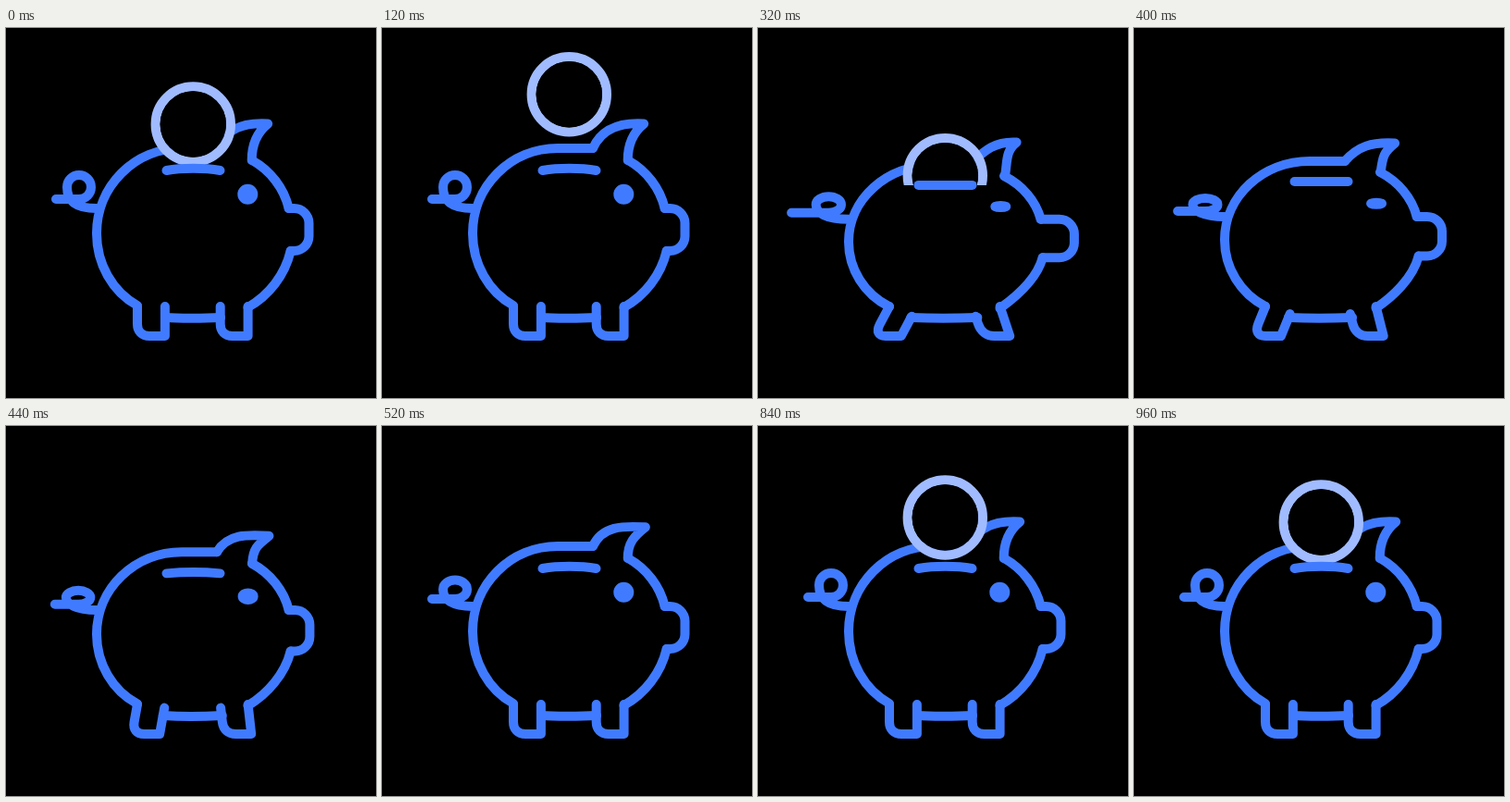
An HTML page with a canvas that plays this animation: 400x400 px, repeating every 1.04 s.

```html
<!DOCTYPE html>
<html lang="en">
<head>
<meta charset="utf-8">
<title>Piggy bank</title>
<style>
  html, body { margin: 0; width: 100%; height: 100%; overflow: hidden; background: #000; }
  canvas { display: block; width: 100%; height: 100%; }
</style>
</head>
<body>
<canvas id="stage" width="400" height="400"></canvas>
<script>
const ctx = document.getElementById('stage').getContext('2d');
const LOOP = 1040, STEP = 40;
const HIT = 240, DEEP = 360;      // coin touches the pig, pig is lowest
const POP = 600;                  // next coin appears
const GROUND = 313;
const BLUE = '#407bff', PALE = '#a0bbff';
const COIN_R = 40.7;

const clamp = u => Math.min(1, Math.max(0, u));
const mix = (a, b, u) => a + (b - a) * u;
const smooth = (from, to, t) => {
  const u = clamp((t - from) / (to - from));
  return u * u * (3 - 2 * u);
};

// Quick push down from HIT to DEEP, then a decaying release until end
const bump = (t, end, power) => t < DEEP
  ? smooth(HIT, DEEP, t)
  : (1 - clamp((t - DEEP) / (end - DEEP))) ** power;

function line(draw, color = BLUE) {
  ctx.beginPath();
  draw();
  ctx.strokeStyle = color;
  ctx.stroke();
}

// k: squash, s: sideways stretch, e: trailing squash of ear and tail
function pig(k, s, e) {
  const low = y => y + .075 * k * (GROUND - y);
  const move = (x, y) => ctx.moveTo(x, low(y));
  const to = (x, y) => ctx.lineTo(x, low(y));
  const curve = (a, b, c, d, x, y) => ctx.bezierCurveTo(a, low(b), c, low(d), x, low(y));

  line(() => {                    // back
    move(142, 300);
    curve(115, 285, 98, 255, 98, 222);
    curve(98, 171, 139, 130, 190, 130);
    to(228, 130);
  });

  line(() => {                    // cheek
    move(266, 143);
    curve(285.7, 154, 300.5, 173, 305.7, 195);
  });

  line(() => {                    // snout
    const right = 327.5 + 5.4 * s;
    move(305.7, 195);
    ctx.arcTo(right, low(195), right, low(218), 16);
    ctx.arcTo(right, low(241), 308, low(241), 16);
    to(307.7, 241);
  });

  line(() => {                    // chest
    move(307.7, 241);
    curve(301.5, 267, 284.5 - 5 * k, 289, 261.5, 302);
  });

  line(() => {                    // belly
    move(172 - 5 * k, GROUND - 5 * k * 0);
    curve(185, 314, 215, 314, 232 + 4 * k, GROUND);
  });

  leg(142, -.4 * k, 0, 8 * k);
  leg(231.7, .25 * k, 8 * k, 0);
  ear(k, e, low);
  tail(k, s, e, low);
  eye(k, low(179.7));
}

// Feet slide outwards while the hips stay; inner ends drop a little
function leg(x, lean, dropL, dropR) {
  const at = (dx, y) => [x + dx + lean * (y - 301), y];
  line(() => {
    ctx.moveTo(...at(0, 301 + dropL));
    ctx.lineTo(...at(0, 320));
    ctx.bezierCurveTo(...at(0, 328), ...at(5, 333), ...at(13, 333));
    ctx.lineTo(...at(29.9, 333));
    ctx.lineTo(...at(29.9, 301 + dropR));
  });
}

// Roots follow the body, the tip trails behind
function ear(k, e, low) {
  const x = 283.2 + 6 * e - 7 * k, y = 103.5 + 21 * e;
  const left = low(130), right = low(143);
  line(() => {
    ctx.moveTo(228, left);
    ctx.bezierCurveTo(238 + 4 * k, left - 22 + 6 * k, x - 25, y - 1.5, x, y);
    ctx.bezierCurveTo(x - 12, y + 9.5, 265.7 + 3 * k, right - 17, 265.7 + k, right);
  });
}

function tail(k, s, e, low) {
  const x = 79 - 2 * k, y = 185 + 6 * k + 7 * e;
  const rx = 13 + .5 * k, ry = 13 - 10 * e + 4 * k;
  const root = low(195);
  line(() => {
    ctx.moveTo(54 - 6.7 * s, y);
    ctx.lineTo(x, y);
    ctx.ellipse(x, y - ry, rx, ry, 0, Math.PI / 2, Math.PI, true);
    ctx.bezierCurveTo(x - rx, root - 7, x - 3, root, 98, root);
  });
}

function eye(k, y) {
  line(() => ctx.ellipse(261.3 + .7 * k, y, 6, 6 - 5 * clamp(k), 0, 0, 7));
  ctx.fillStyle = BLUE;
  ctx.fill();
}

function slot(k, y) {
  const bend = 3 * (1 - clamp(k));
  line(() => {
    ctx.moveTo(173.5, y);
    ctx.bezierCurveTo(190, y - bend, 215, y - bend, 231.5, y);
  });
}

function coin(y, r, floor) {
  ctx.save();
  ctx.beginPath();
  ctx.rect(0, 0, 400, floor);
  ctx.clip();
  line(() => ctx.arc(202.3, y, r, 0, 7), PALE);
  ctx.fillStyle = '#000';
  ctx.beginPath();
  ctx.arc(202.3, y, Math.max(0, r - 5), 0, 7);
  ctx.fill();
  ctx.restore();
}

// Hop to the top, then free fall into the slot
function dropY(t) {
  const top = 150;
  return t < top ? mix(104, 68, smooth(0, top, t)) : 68 + .00317 * (t - top) ** 2;
}

function popY(t) {
  const u = clamp((t - POP) / 360);
  return mix(45.5, 104, 1 - (1 - u * u) ** 4.2);
}

function draw(t) {
  const k = 1.8 * bump(t, 520, 2);
  const s = 3.6 * bump(t, 520, 4.4);
  const e = 1.29 * bump(t, 600, 1.4);
  const slotY = 154 + .075 * k * (GROUND - 154);

  ctx.fillStyle = '#000';
  ctx.fillRect(0, 0, 400, 400);
  ctx.lineWidth = 10;
  ctx.lineCap = ctx.lineJoin = 'round';

  pig(k, s, e);
  if (t < DEEP) coin(dropY(t), COIN_R, slotY);
  else if (t > POP) coin(popY(t), COIN_R * smooth(POP, POP + 160, t), slotY);
  slot(k, slotY);
}

function tick() {
  const t = performance.now() % LOOP;
  draw(Math.floor(t / STEP) * STEP);
  requestAnimationFrame(tick);
}
tick();
</script>
</body>
</html>
```
